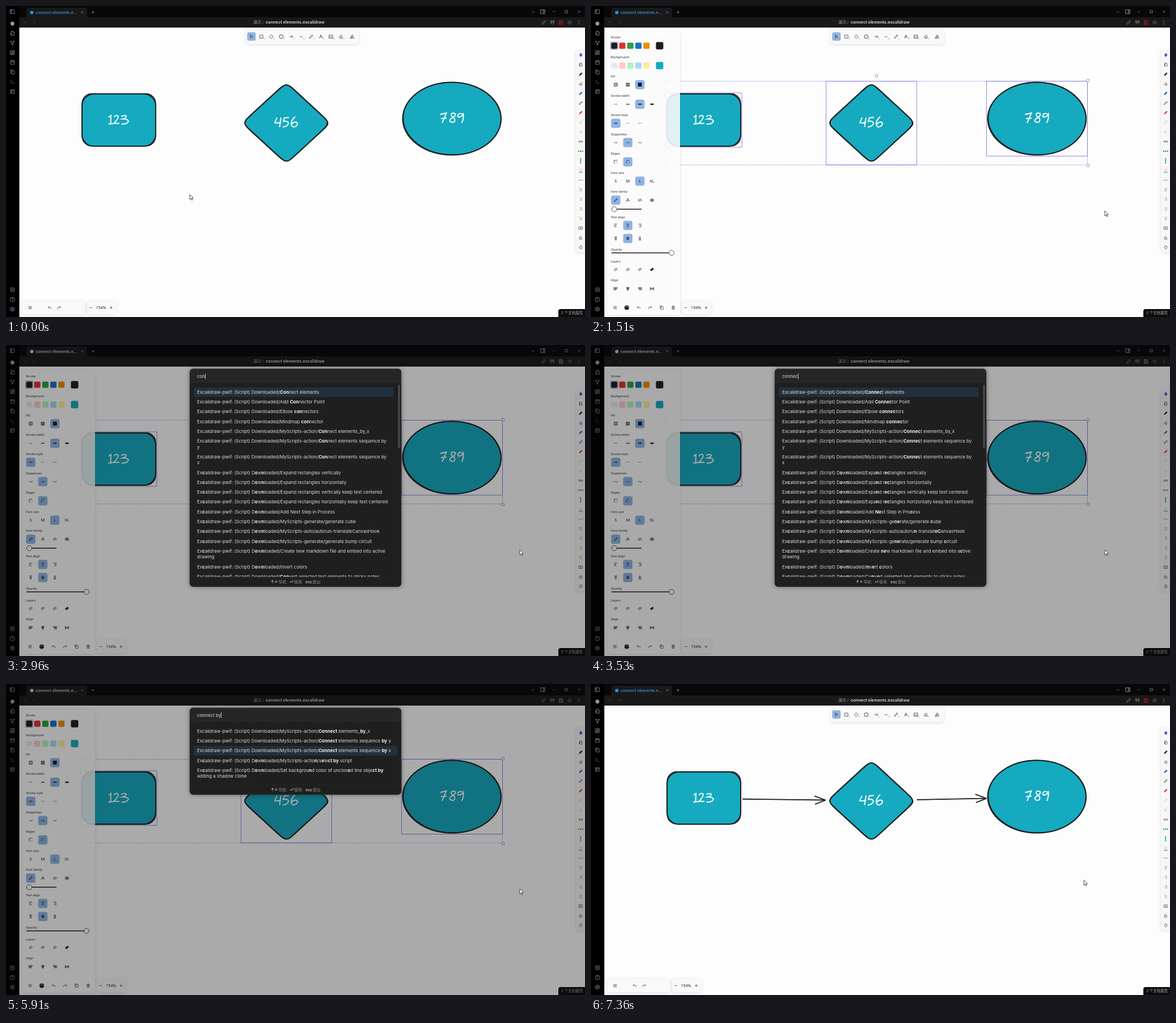
These frames come from a looping animation (1021x548 px, 8.42 s). An HTML page with a canvas:

```html
<!DOCTYPE html>
<html lang="zh-CN">
<head>
<meta charset="utf-8">
<title>Connect elements</title>
<style>
html, body { margin: 0; width: 100%; height: 100%; overflow: hidden; background: #fdfdfd; }
canvas { display: block; width: 1021px; height: 548px; }
</style>
</head>
<body>
<canvas id="stage"></canvas>
<script>
const W = 1021, H = 548, LOOP = 8420;
const canvas = document.getElementById('stage');
const g = canvas.getContext('2d');
const dpr = window.devicePixelRatio || 1;
canvas.width = W * dpr;
canvas.height = H * dpr;

const UI = 'Inter, "Noto Sans CJK SC", "Noto Sans CJK", sans-serif';
const PANEL = '"Noto Sans", sans-serif';
const INK = '#1e1e1e', TEAL = '#15aabf', VIOLET = '#6965db', ACTIVE = '#8fb4e5';

// Timeline in ms
const T = { move: 260, drag: 560, release: 1508, open: 2390, close: 6310, linked: 6400, leave: 6880, clear: 7264 };
const TYPING = [[2390, ''], [2680, 'c'], [2770, 'co'], [2960, 'con'], [3150, 'conn'], [3530, 'connec'],
  [3830, 'connect'], [4300, 'connect '], [4670, 'connect b'], [4860, 'connect by']];
const TRACK = [[164, 324, 332], [560, 70, 71], [1040, 849, 300], [1420, 906, 361], [6784, 906, 361], [7360, 869, 345.5]];

// Icons on a 24-unit grid
const ICON = {
  side: 'M3 4h18v16H3zM9 4v16M5 8h2M5 11h2',
  file: 'M20 8v13H6V3h9zM15 3v5h5M2 14h9M8 11l3 3-3 3',
  fork: 'M6 9v2q0 3 6 3t6-3V9M12 14v3M4 4h4v4H4zM16 4h4v4h-4zM10 17h4v4h-4z',
  grid: 'M3 3h8v10H3zM14 3h7v6h-7zM14 12h7v9h-7zM3 16h8v5H3z',
  calendar: 'M4 5h16v16H4zM4 10h16M8 2v5M16 2v5',
  copy: 'M8 7h12v14H8zM4 17V3h11',
  prompt: 'M4 17l6-6-6-6M12 19h8',
  table: 'M4 4h16v16H4zM4 9h16M9 9v11',
  vault: 'M4 4h16v16H4zM9 12a3 3 0 1 0 6 0a3 3 0 1 0-6 0',
  help: 'M2 12a10 10 0 1 0 20 0a10 10 0 1 0-20 0M9 9q0-3 3-3t3 3q0 2-3 4M12 16v2',
  gear: 'M4 12a8 8 0 1 0 16 0a8 8 0 1 0-16 0M9 12a3 3 0 1 0 6 0a3 3 0 1 0-6 0M12 1v3M12 20v3M2 7l3 1M19 16l3 1M2 17l3-1M19 8l3-1',
  left: 'M20 12H4l6-6M4 12l6 6',
  right: 'M4 12h16l-6-6M20 12l-6 6',
  down: 'M5 9l7 7 7-7',
  minus: 'M5 12h14',
  plus: 'M5 12h14M12 5v14',
  cross: 'M5 5l14 14M19 5L5 19',
  box: 'M4 4h16v16H4z',
  link: 'M10 13q3 3 6 0l4-4q2-4-3-6-3 0-5 3M14 11q-3-3-6 0l-4 4q-2 4 3 6 3 0 5-3',
  quotes: 'M3 4h7v8q0 5-6 8M14 4h7v8q0 5-6 8M3 4v8h7M14 4v8h7',
  save: 'M3 3h14l4 4v14H3zM7 3v6h8V3M7 21v-8h10v8',
  ring: 'M4 12a8 8 0 1 0 16 0a8 8 0 1 0-16 0',
  arrow: 'M5 3l14 9-7 2-3 6z',
  diamond: 'M12 2l10 10-10 10L2 12z',
  pencil: 'M4 20l2-6L17 3l4 4L10 18zM15 5l4 4',
  letter: 'M4 20l8-17 8 17M7 14h10',
  image: 'M3 4h18v16H3zM3 17l6-6 5 5 3-3 4 4M15 8h1',
  eraser: 'M3 15L14 4l7 7-9 9H8zM9 9l7 7M11 20h10',
  shapes: 'M12 3l4 7H8zM3 14h7v7H3zM14 17a3 3 0 1 0 7 0a3 3 0 1 0-7 0',
  menu: 'M3 6h18M3 12h18M3 18h18',
  undo: 'M9 5L4 10l5 5M4 10h11q6 1 5 9',
  redo: 'M15 5l5 5-5 5M20 10H9q-6 1-5 9',
  trash: 'M4 7h16M6 7l1 14h10l1-14M9 7V3h6v4M10 11v6M14 11v6',
  hand: 'M5 13l4 7h8l3-6V8h-3V4h-3V3h-3v2H8v9z',
  lock: 'M5 11h14v10H5zM8 11V6q4-5 8 0',
  book: 'M2 5h20v14H2zM12 5v14',
  list: 'M9 5h12M9 12h12M9 19h12M3 5h1M3 12h1M3 19h1',
  lines: 'M4 5h16M8 12h12M4 19h16',
  chain: 'M2 8h6v8H2zM16 8h6v8h-6zM8 12h8',
  dotsH: 'M1 10h4v4H1zM10 10h4v4h-4zM19 10h4v4h-4z',
  dotsV: 'M10 1h4v4h-4zM10 10h4v4h-4zM10 19h4v4h-4z',
  bolt: 'M18 3L6 11l11 3-11 7',
  wave: 'M3 15q5-9 9-2t9-4',
  hatch: 'M4 4h16v16H4zM4 12l8-8M4 20L20 4M12 20l8-8',
  weave: 'M4 4h16v16H4zM4 12l8-8M4 20L20 4M12 20l8-8M4 12l8 8M4 4l16 16M12 4l8 8',
  corner: 'M4 20V4h16M20 9v2M20 15v2M9 20h2M15 20h2',
  round: 'M4 20v-7q0-9 9-9h7M20 9v2M20 15v2M9 20h2M15 20h2',
  code: 'M8 6l-6 6 6 6M16 6l6 6-6 6M14 4l-4 16',
  glyph: 'M4 7h16v8H4zM12 2v20M15 12l6 9M8 11l-5 8',
  alignL: 'M3 5h17M3 12h10M3 19h14',
  alignC: 'M3 5h18M7 12h10M5 19h14',
  alignR: 'M4 5h17M11 12h10M7 19h14',
  top: 'M4 4h16M9 8h6v12H9z',
  middle: 'M3 12h5M16 12h5M8 6h8v12H8zM12 2v20',
  bottom: 'M4 20h16M9 4h6v12H9z',
  layer: 'M3 13l6-6 6 6-6 6zM10 7l5-4 6 6-5 5',
  barL: 'M3 3v18M7 6h13v4H7zM7 14h8v4H7z',
  barC: 'M12 2v20M5 6h14v4H5zM8 14h8v4H8z',
  barR: 'M21 3v18M4 6h13v4H4zM9 14h8v4H9z',
  spread: 'M3 3v18M21 3v18M8 9h8v6H8zM3 12h5M16 12h5'
};
for (const k in ICON) ICON[k] = new Path2D(ICON[k]);

const DIGITS = [
  'M181 196l4-3-.5 14.5M180.5 208l8-.7M190.500 196q3-5 7-2.500 2 4-7.500 13.500l10-.3M203 194.500q7-3 9-.5.500 3-6 5 9 0 10 4-3 6-12.500 5',
  'M478 196.500q-3 7-4 9 4 1.500 11-.5M485 196.500q-2 9-2.500 17M499 196.500l-8 .3-2 6.500q9-1.500 9 4-2 5-10 6M510 195q-8 7-7 14 2 6 8 3 6-6 0-7.500-5 0-8 5',
  'M765.500 191q6-1 11-2.500-4 10-7.500 17.500M767 198.500l10-1M793 190q-7-3-8 1 0 4 6 7 2 7-4 7-7-1-3-6 8-4 9-9M806 191q-7-4-9.500 2 1 6 9-.5l1-2q1 8-3 15.500'
].map(d => new Path2D(d));

const BOXES = [[131.5, 153, 266, 249], [414.5, 132.500, 574.5, 280], [697.5, 132.500, 875.5, 264.5]];

const BASIC = `保存当前文件\tCtrl + S
解锁/锁定
左右分屏
上下分屏
堆叠/取消堆叠标签页
编辑文件名\tF2
复制当前文件的路径
复制 Quelvint 链接
重新打开标签页\tCtrl + Shift + T
在新窗口中打开当前面板
将当前面板移动至新窗口
转到下一个标签\tCtrl + Tab\tCtrl + Page Down
转到标签 #1\tCtrl + 1
转到最后一个标签\tCtrl + 9
转到上一个标签\tCtrl + Shift + Tab\tCtrl + Page Up
新标签页\tCtrl + T
Kanban: 创建新看板
Banners: Add/Change banner with local image
Banners: Add/Change emoji icon
Banners: Remove banner from selected note`.split('\n');

// "~" breaks a line only beside the scrollbar, "|" always does
const PREFIX = 'Excalidraw-pwif: (Script) Downloaded/';
const SCRIPTS = `Connect elements
Add Connector Point
Elbow connectors
Mindmap connector
MyScripts-action/Connect elements_by_x
MyScripts-action/Connect elements sequence by~y
MyScripts-action/Connect elements sequence by~x
Expand rectangles vertically
Expand rectangles horizontally
Expand rectangles vertically keep text centered
Expand rectangles horizontally keep text centered
Add Next Step in Process
MyScripts-generate/generate cube
MyScripts-auto/autorun-translateCanvasHook
MyScripts-generate/generate bump circuit
Create new markdown file and embed into active|drawing
Invert colors
Convert selected text elements to sticky notes
Convert freedraw to line and select it
Normalize selected arrows
Reverse selected arrows`.split('\n').map(s => PREFIX + s);
const NARROW = [4, 5, 6].map(i => SCRIPTS[i]).concat([
  PREFIX + 'MyScripts-action/select by script',
  PREFIX + 'Set background color of unclosed line object by|adding a shadow clone']);

function text(s, x, y, size, color, opt = {}) {
  g.font = `${opt.weight || 400} ${size}px ${opt.family || UI}`;
  g.textAlign = opt.align || 'left';
  g.textBaseline = 'middle';
  g.fillStyle = color;
  g.fillText(s, x, y);
  return g.measureText(s).width;
}

function rect(x, y, w, h, color) {
  g.fillStyle = color;
  g.fillRect(x, y, w, h);
}

function pill(x, y, w, h, r, color, shadow) {
  g.save();
  if (shadow) {
    g.shadowColor = 'rgba(0,0,0,.13)';
    g.shadowBlur = 5 * dpr;
    g.shadowOffsetY = dpr;
  }
  g.beginPath();
  g.roundRect(x, y, w, h, r);
  g.fillStyle = color;
  g.fill();
  g.restore();
}

function disc(x, y, r, fill, stroke) {
  g.beginPath();
  g.arc(x, y, r, 0, 7);
  g.fillStyle = fill;
  g.fill();
  if (stroke) { g.strokeStyle = stroke; g.lineWidth = .8; g.stroke(); }
}

function line(x1, y1, x2, y2, color, width) {
  g.beginPath();
  g.moveTo(x1, y1);
  g.lineTo(x2, y2);
  g.strokeStyle = color;
  g.lineWidth = width;
  g.stroke();
}

function icon(name, x, y, color, size = 9, width = 1.9, filled) {
  g.save();
  g.translate(x - size / 2, y - size / 2);
  g.scale(size / 24, size / 24);
  g.strokeStyle = g.fillStyle = color;
  g.lineWidth = width;
  if (filled) g.fill(ICON[name]);
  g.stroke(ICON[name]);
  g.restore();
}

function diamondPath(d, cut) {
  const pts = [[494.3, 134.5 + d], [571.8, 206 + d], [494.5, 277.8 - d], [416.3 + d, 206]];
  const mix = (a, b) => [a[0] + (b[0] - a[0]) * cut, a[1] + (b[1] - a[1]) * cut];
  g.beginPath();
  pts.forEach((p, i) => {
    const a = mix(p, pts[(i + 3) % 4]), b = mix(p, pts[(i + 1) % 4]);
    g[i ? 'lineTo' : 'moveTo'](...a);
    g.bezierCurveTo(...p, ...p, ...b);
  });
  g.closePath();
}

function sketch(path, alt) {
  g.strokeStyle = INK;
  path(); g.fillStyle = TEAL; g.fill();
  g.lineWidth = 2; g.stroke();
  alt(); g.lineWidth = 1.6; g.stroke();
}

function drawShapes() {
  const round = (x, y, w, h, r) => () => { g.beginPath(); g.roundRect(x, y, w, h, r); };
  const oval = (x, y, rx, ry, a) => () => { g.beginPath(); g.ellipse(x, y, rx, ry, a, 0, 7); };
  sketch(round(134, 155, 130, 92, 21), round(134.3, 154.5, 129.5, 92.2, 17));
  sketch(() => diamondPath(0, .25), () => diamondPath(.8, .21));
  sketch(oval(786.3, 198.5, 86.8, 64, 0), oval(786.6, 198.3, 86.2, 63.8, .025));
  line(767, 136.5, 775, 134.5, INK, 1.6);
  g.strokeStyle = '#fff';
  g.lineWidth = 1.9;
  DIGITS.forEach(d => g.stroke(d));
}

function connector(x1, y1, x2, y2) {
  line(x1, y1, x2, y2, INK, 1.7);
  line(x1 + 1, y1 + .4, x2 - 3, y2 - .4, INK, .9);
  line(x2 - 19.5, y2 - 7.2, x2, y2, INK, 1.7);
  line(x2 - 18.5, y2 + 7.3, x2, y2, INK, 1.7);
}

function drawSelection(sel) {
  if (!sel.length) return;
  g.strokeStyle = VIOLET;
  g.lineWidth = .75;
  sel.forEach(([a, b, c, d]) => g.strokeRect(a, b, c - a, d - b));
  const [x1, y1, x2, y2] = [Math.min, Math.min, Math.max, Math.max].map((f, i) => f(...sel.map(b => b[i])));
  if (sel.length > 1) {
    g.setLineDash([1.5, 1.5]);
    g.strokeRect(x1, y1, x2 - x1, y2 - y1);
    g.setLineDash([]);
  }
  const spots = [[x1 - 1, y1 - 1], [x2 + .8, y1 - 1], [x1 - 1, y2 + .8], [x2 + .8, y2 + .8], [(x1 + x2) / 2, y1 - 9.5]];
  spots.forEach(([x, y]) => {
    g.beginPath();
    g.roundRect(x - 2.4, y - 2.4, 4.8, 4.8, 1.6);
    g.fillStyle = '#fff';
    g.fill();
    g.stroke();
  });
}

const ROWS = [
  ['Fill', 124, 2, ['hatch', 'weave', '#']],
  ['Stroke width', 158.5, 2, [.6, 1.2, 1.8, 2.4]],
  ['Stroke style', 192, 0, [1.2, [1, 1.2], [.7, .5]]],
  ['Sloppiness', 226, 1, ['wave', 'wave', 'wave']],
  ['Edges', 260, 1, ['corner', 'round']],
  ['Font size', 294, 2, ['@S', '@M', '@L', '@XL']],
  ['Font family', 327.5, 0, ['pencil', 'letter', 'code', 'glyph']],
  ['Text align', 372, 1, ['alignL', 'alignC', 'alignR']],
  ['', 395, 1, ['top', 'middle', 'bottom']],
  ['Layers', 450, -1, ['layer', 'layer', 'layer', 'layer']],
  ['Align', 483.5, -1, ['barL', 'barC', 'barR', 'spread']]
];

function swatches(y, colors, current) {
  colors.forEach((c, i) => pill(35.5 + i * 14.2, y - 5.5, 11, 11, 2, c));
  pill(114.5, y - 6.5, 13, 13, 2.5, current);
}

function label(s, y) { text(s, 35, y, 5.6, '#2b2b30', { family: PANEL }); }

function slider(y, end, knob) {
  line(36, y, end, y, '#1b1b1f', 1.5);
  disc(knob, y, 4.5, '#fff', '#333');
}

function drawPanel() {
  pill(29, 45, 128, 499, 4, 'rgba(255,255,255,.88)', true);
  label('Stroke', 55);
  swatches(70, [INK, '#e03131', '#2f9e44', '#1971c2', '#f08c00'], INK);
  g.strokeStyle = '#7b78dd';
  g.lineWidth = .7;
  g.strokeRect(34.6, 63.6, 12.8, 12.8);
  label('Background', 90);
  swatches(105, ['#f1f1f1', '#ffc9c9', '#b2f2bb', '#a5d8ff', '#ffec99'], TEAL);
  for (let i = 0; i < 8; i++) rect(36 + i % 4 * 2.6 + (i > 3 ? 1.3 : 0), i > 3 ? 105 : 101.5, 1.3, 2.5, '#d5d5d5');

  ROWS.forEach(([name, y, on, items]) => {
    label(name, y);
    const cy = y + 14.6;
    items.forEach((it, i) => {
      const x = 43.6 + i * 21.3;
      if (i === on) pill(x - 8.2, cy - 8.2, 16.4, 16.4, 3.5, ACTIVE);
      if (typeof it === 'number') line(x - 3, cy, x + 3, cy, INK, it);
      else if (Array.isArray(it)) {
        g.setLineDash(it);
        line(x - 3.2, cy, x + 3.2, cy, INK, .8);
        g.setLineDash([]);
      } else if (it === '#') pill(x - 3.5, cy - 3.5, 7, 7, 1, INK);
      else if (it[0] === '@') text(it.slice(1), x, cy, 7.5, INK, { align: 'center', family: PANEL });
      else icon(it, x, cy, INK, 8, 2.3, it === 'layer' && i === 3);
    });
  });
  slider(358, 89, 41);
  label('Opacity', 429);
  slider(435, 142, 142);
}

function drawBottom(open) {
  const shift = open ? 17.5 : 0;
  if (!open) pill(29, 519.5, 110.5, 24, 4, '#f9f9f9', true);
  pill(143 + shift, 519.5, 51.5, 24, 4, '#f9f9f9', true);
  const items = open ? { menu: 42.5, undo: 84, redo: 104, copy: 124.5, trash: 145 } : { menu: 42.5, undo: 77, redo: 93.5 };
  for (const k in items) icon(k, items[k], 531.5, '#222', 8, 2);
  if (open) {
    disc(63, 531.5, 4, INK);
    for (let i = 0; i < 4; i++) disc(60.8 + i * 1.5, i % 3 ? 529 : 530.8, .6, '#fff');
  }
  icon('minus', 149.5 + shift, 531.5, '#222', 8, 2);
  icon('plus', 185.5 + shift, 531.5, '#222', 8, 2);
  text('154%', 167.7 + shift, 531.7, 7, '#222', { align: 'center', family: PANEL });
}

function drawToolbar() {
  pill(422, 42, 200, 25, 4, '#f9f9f9', true);
  pill(425.3, 46.3, 15, 15, 3.5, ACTIVE);
  const tools = ['arrow', 'box', 'diamond', 'ring', 'right', 'minus', 'pencil', 'letter', 'image', 'eraser', 'shapes'];
  tools.forEach((k, i) => {
    const x = i === 10 ? 610.5 : 432.8 + i * 17.5;
    icon(k, x, 54, '#222', k === 'ring' ? 10 : 8.5, 2);
    if (i < 10) text((i + 1) % 10, x + 4.2, 58.3, 3.2, '#777');
  });
}

const SIDE = [['hand', '#7048e8', 1], ['file', '#222'], ['pencil', '#111', 1], ['eraser', '#222'], ['pencil', '#1864ab', 1],
  ['pencil', '#111'], ['pencil', '#e03131', 1], ['pencil', '#bbb'], ['bolt', '#aaa'], ['chain', '#444'], ['dotsH', '#2f9e44', 1],
  ['dotsV', '#12a06a', 1], ['lines', '#f08c5a'], ['', '#4a8f97'], ['lines', '#777'], ['list', '#777'], ['list', '#777'],
  ['lines', '#e0603c'], ['book', '#222'], ['lock', '#333'], ['hand', '#333']];

function drawSideTools() {
  pill(1005, 77, 22, 357, 4, '#f7f7f7', true);
  SIDE.forEach(([k, c, fill], i) => {
    const y = 86.3 + i * 16.95;
    if (k) icon(k, 1013.3, y, c, k.startsWith('dots') ? 9 : 7.5, 2, fill);
    else text('Label', 1013.3, y, 3.3, c, { align: 'center' });
    if (i === 12) line(1010, y + 3.5, 1017, y + 3.5, '#22a0b8', 1);
  });
}

function drawFrame(focused, unsaved) {
  const gray = '#989898';
  rect(0, 0, W, 38, '#080808');
  rect(0, 0, 23.5, H, '#000');
  rect(23.5, 20, W, 18, '#191919');
  pill(36, 3, 107, 20, [4, 4, 0, 0], '#191919');
  const tint = focused ? '#2f8fd6' : '#c8c8c8';
  disc(45.5, 11.5, 3, tint);
  text('connect elements.e...', 52, 11.5, 7, tint, { weight: 600 });
  icon('cross', 134.5, 11, '#aaa', 7, 2);
  icon('plus', 153.5, 11, '#aaa', 8, 2);
  icon('side', 11, 10, gray, 10);
  disc(11.3, 31, 3.4, gray);
  ['file', 'fork', 'grid', 'calendar', 'copy', 'prompt', 'table'].forEach((k, i) => icon(k, 11.3, 48 + i * 17.1, gray, 9.5));
  ['vault', 'help', 'gear'].forEach((k, i) => icon(k, 11.3, 500 + i * 17.1, gray, 9.5));

  icon('left', 34, 29, '#454545', 8);
  icon('right', 49.5, 29, '#454545', 8);
  text('演示', 436, 29.2, 7.2, '#a0a0a0');
  text('/', 451.8, 29.2, 7.2, '#777');
  text('connect elements.excalidraw', 458, 29.2, 7.3, '#dedede', { weight: 600 });

  icon('down', 929.5, 10.5, '#aaa', 8);
  g.save();
  g.translate(946.5 * 2, 0);
  g.scale(-1, 1);
  icon('side', 946.5, 10, '#aaa', 10);
  g.restore();
  icon('minus', 966, 10, '#aaa', 7);
  icon('box', 988, 10, '#aaa', 6.5, 2.5);
  icon('cross', 1010.5, 10, '#aaa', 7);
  icon('link', 948, 29, gray, 9);
  icon('quotes', 963.3, 29, gray, 9);
  icon('save', 978.7, 29, unsaved ? '#d01c1c' : gray, 9);
  disc(994, 29, 3.8, '#383838');
  for (let i = -1; i < 2; i++) disc(1010, 29 + i * 2.8, .75, gray);
}

function drawStatus() {
  pill(974, 534, 50, 16, [4, 0, 0, 0], '#0c0c0c');
  text('2 个文档属性', 979, 541.5, 6.5, '#a8a8a8');
}

// Indexes of the characters a query matches, or null
function match(s, query) {
  const low = s.toLowerCase(), hits = new Set();
  const words = query.trim().split(' ');
  if (words.every(w => low.includes(w))) {
    words.forEach(w => { for (let i = 0; i < w.length; i++) hits.add(low.indexOf(w) + i); });
    return hits;
  }
  let at = -1;
  for (const c of query.trim()) {
    at = low.indexOf(c, at + 1);
    if (at < 0) return null;
    hits.add(at);
  }
  return hits;
}

function drawMatch(s, hits, x0, y) {
  let x = x0, run = '', bold = false;
  const flush = () => {
    if (run) x += text(run, x, y, 8, bold ? '#f0f0f0' : '#dadada', { weight: bold ? 700 : 400 });
    run = '';
  };
  [...s].forEach((c, i) => {
    if (c === '|') { flush(); x = x0; y += 10.4; return; }
    if (hits.has(i) !== bold) { flush(); bold = hits.has(i); }
    run += c;
  });
  flush();
}

function drawKeys(keys, y) {
  let right = 677;
  keys.reverse().forEach(k => {
    g.font = `400 6.5px ${UI}`;
    const w = g.measureText(k).width;
    pill(right - w - 5.5, y - 5.4, w + 5.5, 10.8, 2, '#151515');
    text(k, right - w - 2.8, y + .2, 6.5, '#dadada');
    right -= w + 7;
  });
}

function drawPalette(t) {
  const query = TYPING.filter(([at]) => t >= at).pop()[1];
  const narrow = query.includes('b');
  const bottom = narrow ? 195 : 426;
  const chosen = t >= 5910 ? 2 : t >= 5820 ? 1 : 0;

  g.save();
  g.shadowColor = 'rgba(0,0,0,.4)';
  g.shadowBlur = 8 * dpr;
  pill(324, 42, 373, bottom - 42, 6, '#1f1f1f');
  g.restore();
  pill(324, 42, 373, 25, [6, 6, 0, 0], '#262626');
  g.beginPath();
  g.roundRect(324, 42, 373, bottom - 42, 6);
  g.strokeStyle = '#3a3a3a';
  g.lineWidth = .6;
  g.stroke();

  if (!query) text('输入命令……', 337, 55.2, 8, '#6a6a6a');
  const width = text(query, 337, 55.2, 8, '#dadada');
  if (t < 5350 || t >= 5820) rect(337 + width, 50, .8, 10, '#e0e0e0');

  g.save();
  g.beginPath();
  g.rect(324, 67, 373, bottom - 84);
  g.clip();
  let y = 83;
  (query ? (narrow ? NARROW : SCRIPTS) : BASIC).forEach((row, i) => {
    const [raw, ...keys] = row.split('\t');
    const s = raw.replace('~', narrow ? ' ' : '|');
    const hits = query ? match(s, query) : new Set();
    if (!hits) return;
    if (i === chosen) pill(331, y - 8.3, narrow ? 359 : 352.5, 16.8, 2.5, '#22303c');
    drawMatch(s, hits, 337, y + .2);
    drawKeys(keys, y);
    y += s.includes('|') ? 27.7 : 17.3;
  });
  g.restore();
  if (!narrow) pill(691.3, 70, 3.6, query ? 111.5 : 63, 1.8, '#484848');

  line(324, bottom - 17, 697, bottom - 17, '#2c2c2c', .7);
  const fy = bottom - 8;
  text('↑↓', 467, fy, 7, '#bbb', { weight: 600 });
  text('导航', 480.5, fy, 7, '#8c8c8c');
  text('↵', 500, fy, 7, '#bbb', { weight: 600 });
  text('使用', 508, fy, 7, '#8c8c8c');
  text('esc', 528, fy, 7, '#bbb', { weight: 600 });
  text('退出', 540.5, fy, 7, '#8c8c8c');
}

function cursorAt(t) {
  const step = start => start + Math.floor((t - start) / 96) * 96;
  if (t >= T.leave) t = step(T.leave);
  else if (t >= T.move) t = step(T.move);
  else t = 0;
  let i = TRACK.findIndex(p => p[0] > t);
  if (i < 0) return TRACK[TRACK.length - 1].slice(1);
  if (i === 0) return TRACK[0].slice(1);
  const [a, b] = [TRACK[i - 1], TRACK[i]];
  const k = (t - a[0]) / (b[0] - a[0]);
  return [a[1] + (b[1] - a[1]) * k, a[2] + (b[2] - a[2]) * k];
}

const POINTER = new Path2D('M0 0v9l2.100-1.900 1.500 3 1.400-.7-1.500-2.900 2.800-.2z');
function drawPointer(x, y) {
  g.save();
  g.translate(x, y);
  g.fillStyle = '#fff';
  g.strokeStyle = '#222';
  g.lineWidth = .8;
  g.fill(POINTER);
  g.stroke(POINTER);
  g.restore();
}

function draw(t) {
  const [cx, cy] = cursorAt(t);
  const modal = t >= T.open && t < T.close;
  const dragging = t >= T.drag && t < T.release;
  let sel = [];
  if (dragging) sel = BOXES.filter(b => b[2] <= cx && b[3] <= cy);
  else if (t >= T.release && t < T.clear) sel = BOXES;

  g.setTransform(dpr, 0, 0, dpr, 0, 0);
  rect(0, 0, W, H, '#fdfdfd');
  drawShapes();
  if (t >= T.linked) {
    connector(267, 202.6, 413.5, 204.6);
    connector(574.5, 203.8, 697.3, 201.6);
  }
  drawSelection(sel);
  if (dragging) {
    rect(70, 71, cx - 70, cy - 71, 'rgba(0,0,200,.04)');
    g.strokeStyle = VIOLET;
    g.lineWidth = .6;
    g.strokeRect(70, 71, cx - 70, cy - 71);
  }
  if (sel.length) drawPanel();
  drawBottom(sel.length > 0);
  drawToolbar();
  drawSideTools();
  drawFrame(!modal, t < T.open || t >= T.linked);
  drawStatus();
  if (modal) {
    rect(0, 0, W, H, 'rgba(10,10,10,.34)');
    drawPalette(t);
  }
  drawPointer(cx, cy);
}

let start;
function tick(now) {
  start ??= now;
  draw((now - start) % LOOP);
  requestAnimationFrame(tick);
}
requestAnimationFrame(tick);
</script>
</body>
</html>
```
